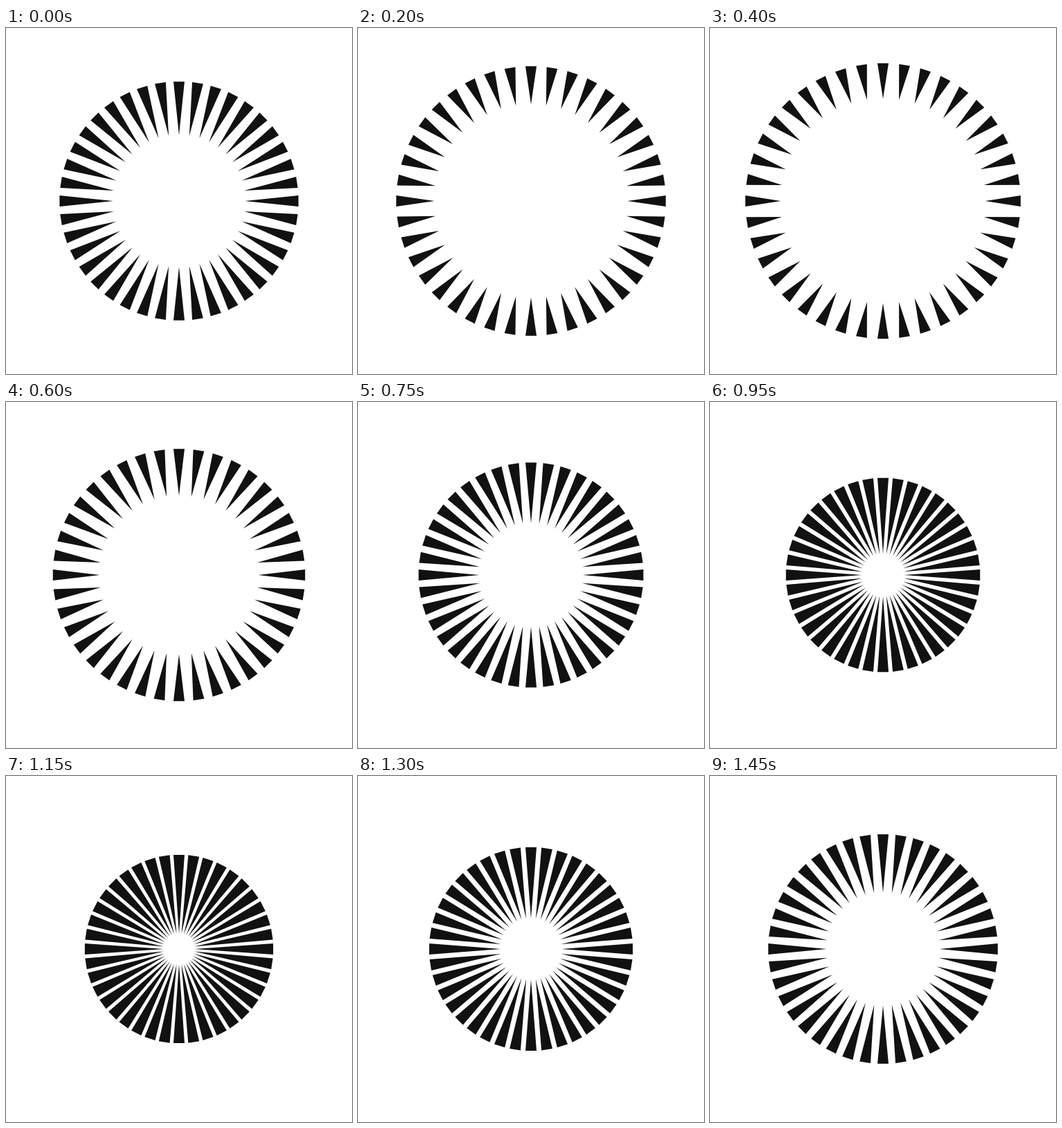
An HTML page for the animation above (1500 ms loop, 500 px wide and 500 px high).

```html
<!DOCTYPE html>
<html lang="en">
<head>
<meta charset="utf-8">
<title>Pulsing rays</title>
<style>
  html, body { margin: 0; width: 100%; height: 100%; overflow: hidden; background: #fff; }
  svg { display: block; width: 100%; height: 100%; }
</style>
</head>
<body>
<svg viewBox="-250 -250 500 500"><path id="rays" fill="#111"/></svg>
<script>
  const LOOP = 1500, STEP = 50;
  const COUNT = 40, HALF_WIDTH = 8, EDGE = 250;
  const PHASE = Math.PI / 20;
  const rays = document.getElementById('rays');

  // Point at distance r along angle a, shifted sideways by s.
  function point(a, r, s) {
    const x = r * Math.sin(a) + s * Math.cos(a);
    const y = s * Math.sin(a) - r * Math.cos(a);
    return x.toFixed(3) + ' ' + y.toFixed(3);
  }

  function draw(time) {
    const t = Math.floor((time % LOOP) / STEP) * STEP;
    const tip = 85 + 65 * Math.sin(2 * Math.PI * t / LOOP + PHASE);
    const base = (tip + EDGE) / 2;
    let d = '';
    for (let i = 0; i < COUNT; i++) {
      const a = 2 * Math.PI * i / COUNT;
      d += `M${point(a, tip, 0)}L${point(a, base, -HALF_WIDTH)}L${point(a, base, HALF_WIDTH)}Z`;
    }
    rays.setAttribute('d', d);
  }

  const start = performance.now();
  function tick() {
    draw(performance.now() - start);
    requestAnimationFrame(tick);
  }
  tick();
</script>
</body>
</html>
```
